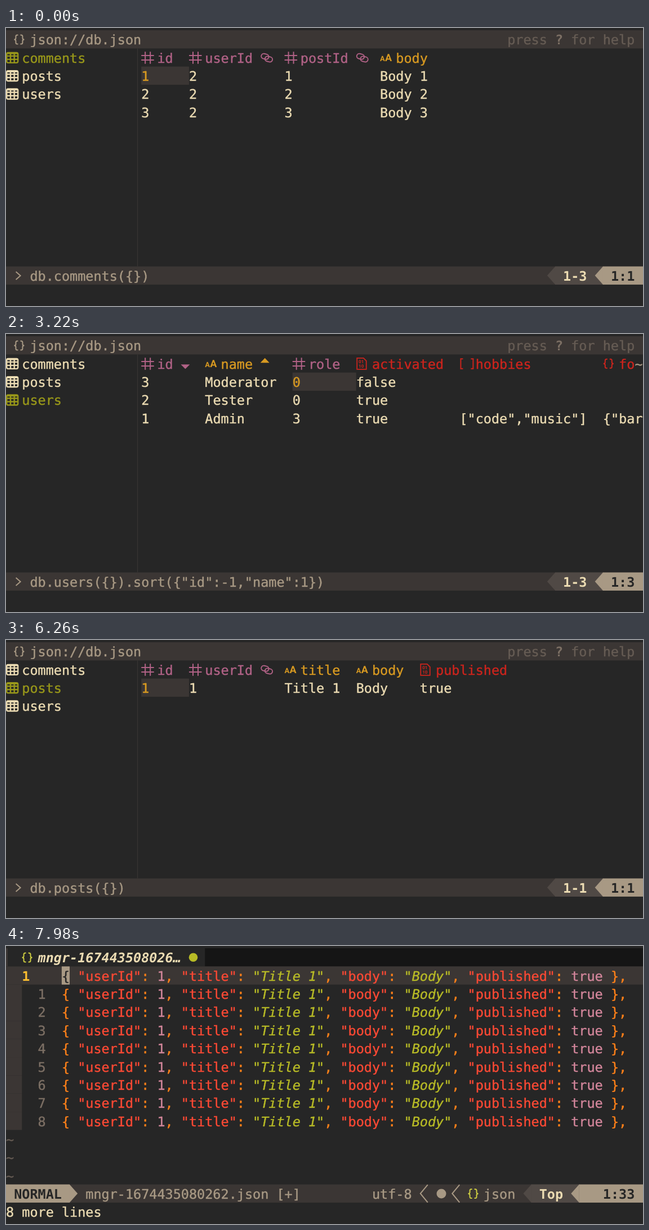
Write an HTML page that moves like this. It is 1131x495 px and loops after 8000 ms.

```html
<!DOCTYPE html>
<html lang="en">
<head>
<meta charset="utf-8">
<title>json://db.json</title>
<style>
  html, body { margin: 0; width: 100%; height: 100%; overflow: hidden; background: #262626; }
  svg { display: block; }
  text { white-space: pre; text-rendering: geometricPrecision; stroke-width: .4;
         font: 23.47px "DejaVu Sans Mono", "Noto Sans Mono", monospace; }
  .b { font-weight: bold; stroke-width: 0; }
  .i { font-style: italic; }
  .line { fill: none; stroke: currentColor; stroke-width: 2; }
  .glyph { fill: currentColor; font-family: Roboto, "Liberation Sans", sans-serif; font-weight: bold; }
</style>
</head>
<body>
<svg id="stage" width="1131" height="495" viewBox="0 0 1131 495"></svg>
<script>
const LOOP = 8000, CW = 14.13, RH = 32.35, TOP = 4, WIDTH = 1131;
const C = {
  bg: '#262626', bar: '#3b3634', mid: '#504945', tan: '#a89984', fg: '#ebdbb2', dim: '#665c54',
  green: '#98971a', yellow: '#d79921', red: '#cc241d', purple: '#b16286',
  key: '#fb4934', punct: '#fe8019', value: '#d3869b', string: '#b8bb26',
  lineNo: '#fabd2f', relNo: '#7c6f64', file: '#cbcb41', blue: '#83a598', dark: '#151515'
};

// ---- drawing on the character grid ----
const px = col => +(col * CW).toFixed(2);
const py = row => +(TOP + row * RH).toFixed(2);

const text = (col, row, str, fill, cls = '') =>
  `<text x="${px(col)}" y="${py(row) + 25.4}" fill="${fill}" stroke="${fill}" class="${cls}">${str}</text>`;
const box = (x, y, w, h, fill) => `<rect x="${x}" y="${y}" width="${w}" height="${h}" fill="${fill}"/>`;
const cells = (col, row, n, fill) => box(px(col), py(row), n * CW, RH, fill);
const fullRow = (row, fill) => box(0, py(row), WIDTH, RH, fill);
const wedge = (col, row, dir, fill) => {
  const x = px(col), y = py(row), base = dir < 0 ? x + CW + .3 : x - .3, tip = dir < 0 ? x : x + CW;
  return `<path d="M${base} ${y}L${tip} ${y + RH / 2}L${base} ${y + RH}z" fill="${fill}"/>`;
};

const ICONS = {
  table: `<rect class="line" x="1.2" y="7.5" width="20" height="18" rx="2.5" style="stroke-width:2.4"/>
    <path class="line" style="stroke-width:2.4" d="M1 9H21M1 13.5H21M1 19.5H21M8 9V25M14.7 9V25"/>`,
  number: '<path class="line" d="M7 6V27.5M16 6V27.5M0 12.7H22.5M0 20.7H22.5"/>',
  string: `<text class="glyph" x="0" y="22.3" style="font-size:13px">A</text>
    <text class="glyph" x="9" y="22.3" style="font-size:18px">A</text>`,
  bool: `<path class="line" style="stroke-width:1.8" d="M1.5 6.5H13L18 11.5V26.5H1.5z"/>
    <text class="glyph" x="4.4" y="16" style="font-size:8px">01</text>
    <text class="glyph" x="4.4" y="24" style="font-size:8px">10</text>`,
  array: '<path class="line" d="M6 8H2V25.5H6M20 8H24V25.5H20"/>',
  object: `<path class="line" d="M8 8.5H6.5Q4 8.5 4 11V14Q4 16.5 1 16.5Q4 16.5 4 19V22Q4 24.5 6.5 24.5H8
    M12 8.5H13.5Q16 8.5 16 11V14Q16 16.5 19 16.5Q16 16.5 16 19V22Q16 24.5 13.5 24.5H12"/>`,
  link: `<g transform="translate(11 16.7) rotate(14)" class="line" style="stroke-width:1.9">
    <rect x="-10.5" y="-6" width="13.5" height="9" rx="4.5"/><rect x="-3" y="-3" width="13.5" height="9" rx="4.5"/></g>`,
  up: '<path fill="currentColor" d="M-.5 15L7.5 6.5L15.5 15z"/>',
  down: '<path fill="currentColor" d="M-.5 18L7.5 26L15.5 18z"/>',
  prompt: '<path class="line" d="M3.5 9.5L11.5 16.5L3.5 23.5"/>',
  divider: '<path class="line" d="M14 .5L1 16.2L14 32"/>',
  disc: '<circle fill="currentColor" cx="10" cy="16.5" r="8.5"/>'
};
const icon = (name, col, row, color) =>
  `<g transform="translate(${px(col)} ${py(row)})" color="${color}">${ICONS[name]}</g>`;

// Splits a line by the pattern and colours every piece with style(piece, rest).
function paint(col, row, line, pattern, style) {
  let out = '';
  for (const m of line.matchAll(pattern)) {
    const [fill, cls] = style(m[0], line.slice(m.index + m[0].length));
    out += text(col + m.index, row, m[0], fill, cls);
  }
  return out;
}

// ---- data ----
const TABLES = {
  comments: { id: 'number', userId: 'number', postId: 'number', body: 'string' },
  posts: { id: 'number', userId: 'number', title: 'string', body: 'string', published: 'bool' },
  users: { id: 'number', name: 'string', role: 'number', activated: 'bool', hobbies: 'array', foo: 'object' }
};
const LINKS = ['userId', 'postId'];
const TYPE_COLOR = { number: C.purple, string: C.yellow, bool: C.red, array: C.red, object: C.red };

function rowsOf(s) {
  if (s.data === 'comments') return [1, 2, 3].map(n => ({ id: n, userId: 2, postId: n, body: 'Body ' + n }));
  if (s.data === 'posts') return [{ id: 1, userId: 1, title: 'Title 1', body: 'Body', published: true }];
  const users = [
    { id: 1, name: 'Admin', role: 3, activated: true, hobbies: ['code', 'music'], foo: { bar: 42, baz: false } },
    { id: 2, name: 'Tester', role: 0, activated: true },
    { id: 3, ...s.third }
  ];
  return s.sort.id === -1 ? users.reverse() : users;
}
const show = v => v === undefined ? '' : typeof v === 'object' ? JSON.stringify(v) : String(v);

const DOC = ['{', '  id: 1,', '  name: "Admin",', '  role: 3,', '  activated: true,', '  hobbies: [',
  '    "code",', '    "music"', '  ],', '  foo: {', '    bar: 42,', '    baz: false', '  }', '}'];

const PRETTY = ['{', '  "userId": 1,', '  "title": "Title 1",', '  "body": "Body",', '  "published": true', '}'];
const JOINED = PRETTY.map(l => l.trim()).join(' ');
const COPIES = Array(9).fill(JOINED + ',');

// ---- browser screen ----
function grid(s) {
  const rows = rowsOf(s);
  let out = '', col = 17;
  Object.entries(TABLES[s.data]).forEach(([key, type], n) => {
    const color = TYPE_COLOR[type], linked = LINKS.includes(key), dir = s.sort[key];
    const values = rows.map(r => show(r[key]));
    const active = n === s.col;
    if (active && s.edit !== null) values[0] = s.edit;
    const w = Math.max(key.length + 2 + (linked || dir ? 2 : 0), ...values.map(v => v.length)) + 2;
    if (col < 79) {
      out += icon(type, col, 1, color) + text(col + 2, 1, key.slice(0, 77 - col), color);
      const tail = linked ? 'link' : dir ? (dir > 0 ? 'up' : 'down') : '';
      if (tail) out += icon(tail, col + key.length + 3, 1, color);
    }
    if (active) out += cells(col, 2, w, s.edit !== null ? C.mid : C.bar);
    values.forEach((v, i) => {
      const fill = active && !i && s.edit === null ? C.yellow : C.fg;
      if (col < 80) out += text(col, i + 2, v.slice(0, 80 - col), fill);
    });
    if (active && s.edit !== null) out += cells(col + s.edit.length, 2, 1, C.fg);
    col += w;
  });
  return col > 82 ? out + text(79, 1, '~', C.tan) : out;
}

function preview(s) {
  const style = (word, rest) =>
    [rest[0] === ':' ? C.red : rest[0] === '"' && /\w/.test(word) ? C.yellow : /\w/.test(word) ? C.purple : C.fg];
  const unit = 12 * RH / DOC.length;
  return DOC.slice(s.scroll, s.scroll + 12)
    .map((l, i) => paint(17, i + 1, l, /\w+|[^\w\s]/g, style)).join('') +
    box(px(79), py(1) + s.scroll * unit, 15, 12 * unit, C.fg);
}

function browser(s) {
  const sorts = Object.keys(s.sort).length ? `.sort(${JSON.stringify(s.sort)})` : '';
  return fullRow(0, C.bar) + icon('object', .95, 0, C.tan) + text(3, 0, 'json://db.json', C.tan) +
    text(63, 0, 'press', C.dim) + text(69, 0, '?', C.relNo, 'b') + text(71, 0, 'for help', C.dim) +
    Object.keys(TABLES).map((name, i) => {
      const color = name === s.tab ? C.green : C.fg;
      return icon('table', 0, i + 1, color) + text(2, i + 1, name, color);
    }).join('') +
    box(233, py(1), 1.2, 12 * RH, '#383533') +
    (s.view === 'doc' ? preview(s) : grid(s)) +
    fullRow(13, C.bar) + icon('prompt', 1, 13, C.tan) + text(3, 13, `db.${s.data}({})${sorts}`, C.tan) +
    wedge(68, 13, -1, C.mid) + cells(69, 13, 6, C.mid) + text(70, 13, '1-' + rowsOf(s).length, C.fg, 'b') +
    wedge(74, 13, -1, C.tan) + cells(75, 13, 6, C.tan) + text(76, 13, '1:' + (s.col + 1), C.bg, 'b') +
    text(0, 14, s.msg, C.fg);
}

// ---- editor screen ----
const codeStyle = (word, rest) =>
  word[0] === '"' ? (rest[0] === ':' ? [C.key] : [C.string, 'i']) : /\w/.test(word) ? [C.value] : [C.punct];

function editor(s) {
  const [line, at] = s.cur, modeColor = { NORMAL: C.tan, INSERT: C.blue, 'V-LINE': C.punct }[s.mode];
  let out = box(0, TOP, WIDTH, RH, C.dark) + box(0, TOP, px(25), RH, C.bg) + box(0, TOP, 3, RH, C.bar) +
    icon('object', 1.95, 0, C.file) + text(4, 0, 'mngr-167443508026…', C.fg, 'b i');
  if (s.dirty) out += `<circle cx="332.5" cy="20.2" r="7.8" fill="${C.string}"/>`;

  for (let i = 0; i < 12; i++) {
    const row = i + 1, str = s.lines[i];
    if (str === undefined) { out += text(0, row, '~', C.dim); continue; }
    out += i === line ? fullRow(row, C.bar) : cells(0, row, 2, C.bar);
    if (s.select >= i) out += cells(7, row, str.length, C.mid);
    out += i === line ? text(2, row, i + 1, C.lineNo, 'b') : text(4, row, Math.abs(i - line), C.relNo);
    out += paint(7, row, str, /"[^"]*"|\w+|[^\w\s]/g, codeStyle);
    if (i === line) {
      const insert = s.mode === 'INSERT', ch = (str[at] || '').trim();
      out += insert ? box(px(7 + at), py(row), 2, RH, C.tan)
        : cells(7 + at, row, 1, C.tan) + text(7 + at, row, ch, C.bg);
    }
  }

  const end = s.mode.length + 2;
  return out + fullRow(13, C.bar) + cells(0, 13, end, modeColor) + wedge(end, 13, 1, modeColor) +
    text(1, 13, s.mode, C.bg, 'b') +
    text(end + 2, 13, 'mngr-1674435080262.json' + (s.dirty ? ' [+]' : ''), C.tan) +
    text(46, 13, 'utf-8', C.tan) + icon('divider', 52, 13, C.tan) + icon('disc', 54, 13, C.tan) +
    icon('divider', 56, 13, C.tan) + icon('object', 58, 13, C.file) + text(60, 13, 'json', C.tan) +
    wedge(65, 13, -1, C.mid) + cells(66, 13, 6, C.mid) + text(67, 13, 'Top', C.fg, 'b') +
    wedge(71, 13, -1, modeColor) + cells(72, 13, 9, modeColor) +
    text(79 - s.ruler.length, 13, s.ruler, C.bg, 'b') + text(0, 14, s.msg, C.fg);
}

// ---- script: each step changes part of the state at its time ----
const start = {
  view: 'grid', tab: 'comments', data: 'comments', sort: {}, col: 0, edit: null, msg: '', scroll: 0,
  third: { name: 'User', role: 0, activated: false },
  lines: [''], cur: [0, 0], mode: 'NORMAL', ruler: '1:1', dirty: false, select: -1
};
const third = (name, role, activated) => ({ name, role, activated });
const saved = '"3" written';
const typing = [...'Moderator'].map((_, i) => [2360 + 60 * i, { edit: 'Moderator'.slice(0, i + 1) }]);

const steps = [
  [0, {}],
  [600, { tab: 'posts' }], [720, { data: 'posts' }], [840, { col: 0 }],
  [1280, { tab: 'users' }], [1400, { data: 'users' }],
  [1820, { sort: { id: 1 } }], [1940, { sort: { id: -1 } }], [2060, { col: 1 }],
  [2180, { sort: { id: -1, name: 1 } }], [2240, { edit: 'User' }], [2300, { edit: '' }],
  ...typing,
  [2920, { edit: null, third: third('Moderator', 0, false), msg: saved }],
  [3220, { col: 2, msg: '' }],
  [3300, { sort: { id: -1, name: 1, role: 1 } }],
  [3380, { sort: { id: -1, name: 1, role: -1 } }],
  [3460, { third: third('Moderator', 1, false), msg: saved }],
  [3760, { col: 3, msg: '' }],
  [3860, { sort: { id: -1, name: 1, role: -1, activated: 1 } }],
  [3940, { third: third('Moderator', 1, true) }], [4020, { msg: saved }],
  [4300, { sort: {}, msg: '' }], [4420, { col: 0 }],
  [4780, { view: 'doc' }],
  [5200, { scroll: 1 }], [5320, { scroll: 2 }], [5440, { scroll: 1 }], [5560, { scroll: 0 }],
  [5680, { view: 'grid' }],
  [6100, { tab: 'posts' }], [6220, { data: 'posts' }],
  [6300, { view: 'blank' }], [6340, { view: 'editor' }], [6380, { lines: PRETTY }],
  [6700, { mode: 'V-LINE', select: 0 }],
  [6760, { cur: [5, 0], select: 5, ruler: '6:1' }],
  [6820, { lines: [JOINED], cur: [0, 69], mode: 'NORMAL', select: -1, dirty: true }],
  [6880, { ruler: '1:70' }], [6940, { cur: [0, 0] }], [6960, { ruler: '1:1' }],
  [7160, { mode: 'INSERT', cur: [0, 70], ruler: '1:71' }],
  [7240, { lines: [JOINED + ','], cur: [0, 71] }], [7320, { ruler: '1:72' }],
  [7380, { mode: 'NORMAL', cur: [0, 70] }], [7440, { ruler: '1:71' }],
  [7580, { lines: COPIES, cur: [1, 0], ruler: '2:1', msg: '8 more lines' }],
  [7640, { cur: [0, 0], ruler: '1:1' }],
  [7700, { cur: [0, 12], ruler: '1:13' }], [7760, { cur: [0, 24], ruler: '1:25' }],
  [7820, { cur: [0, 31], ruler: '1:32' }], [7880, { cur: [0, 32] }], [7920, { ruler: '1:33' }],
  [7980, { cur: [0, 0] }]
];

let state = start;
const timeline = steps.map(([at, patch]) => ({ at, state: state = { ...state, ...patch } }));

function render(s) {
  const body = s.view === 'blank' ? '' : s.view === 'editor' ? editor(s) : browser(s);
  return box(0, 0, WIDTH, 495, C.bg) + body;
}

const stage = document.getElementById('stage');
const began = performance.now();
let shown = -1;
function tick() {
  const t = (performance.now() - began) % LOOP;
  const now = timeline.findLastIndex(e => e.at <= t);
  if (now !== shown) stage.innerHTML = render(timeline[shown = now].state);
  requestAnimationFrame(tick);
}
tick();
</script>
</body>
</html>
```
